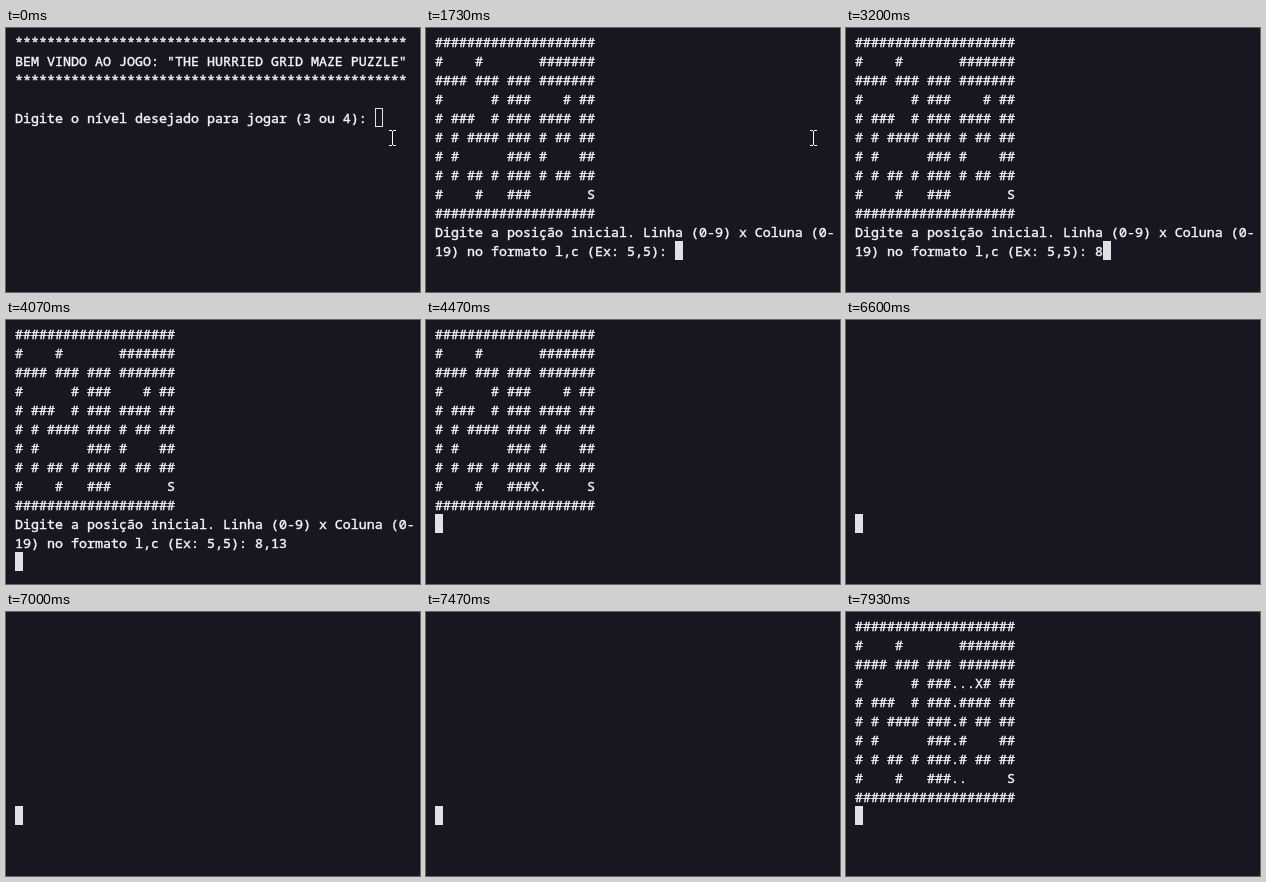
An HTML page for the animation above (8000 ms loop, 414 by 264 pixels).

```html
<!DOCTYPE html>
<html lang="pt">
<head>
<meta charset="utf-8">
<title>Labirinto</title>
<style>
html, body { margin: 0; width: 100%; height: 100%; overflow: hidden; background: #191622; }
svg { display: block; width: 414px; height: 264px; }
text {
  font: 13.333px "Noto Sans Mono", "DejaVu Sans Mono", monospace;
  white-space: pre; fill: #f6f6f8; stroke: #f6f6f8; stroke-width: .4px;
}
#caret { fill: #e1e1e6; stroke: #e1e1e6; }
#mouse { fill: none; stroke: #fff; }
</style>
</head>
<body>
<svg id="stage" viewBox="0 0 414 264">
  <rect id="caret" width="7" height="18"/>
  <path id="mouse" d="M0 .5h3m1 0h3M3.5 1v14M0 15.5h3m1 0h3"/>
</svg>
<script>
const LOOP = 8000, LEFT = 9, TOP = 4, CELL = 8, LINE = 19, BASE = 15;
const stage = document.getElementById('stage');
const caret = document.getElementById('caret');
const mouse = document.getElementById('mouse');

const stars = '*'.repeat(49);
const intro = [
  stars,
  'BEM VINDO AO JOGO: "THE HURRIED GRID MAZE PUZZLE"',
  stars,
  '',
  'Digite o nível desejado para jogar (3 ou 4): '
];
const maze = [
  '####################',
  '#    #       #######',
  '#### ### ### #######',
  '#      # ###    # ##',
  '# ###  # ### #### ##',
  '# # #### ### # ## ##',
  '# #      ### #    ##',
  '# # ## # ### # ## ##',
  '#    #   ###       S',
  '####################'
];
const ask = [
  'Digite a posição inicial. Linha (0-9) x Coluna (0-',
  '19) no formato l,c (Ex: 5,5): '
];
const answer = '8,13', keyTimes = [3200, 3330, 3470, 3670];

// Walk: time, row, column
const start = [4400, 8, 13];
const walk = [
  [4470, 8, 12], [4870, 7, 12], [5330, 6, 12], [5800, 5, 12], [6200, 4, 12],
  [6670, 3, 12], [7070, 3, 13], [7530, 3, 14], [7930, 3, 15]
];
// Cleared screen: from, until
const clears = [[4400, 4470], [5730, 5800], [6600, 6670], [7000, 7070], [7470, 7530], [7870, 7930]];

const lines = Array.from({ length: 13 }, (_, row) => {
  const el = document.createElementNS('http://www.w3.org/2000/svg', 'text');
  el.setAttribute('x', LEFT);
  el.setAttribute('y', TOP + row * LINE + BASE);
  return stage.insertBefore(el, caret);
});

const put = (row, col, ch) => row.slice(0, col) + ch + row.slice(col + 1);

// Types into the last row; the caret follows it until Enter is pressed
function prompt(rows, typed, entered) {
  const last = rows.length - 1;
  const text = rows[last] + typed;
  return {
    rows: [...rows.slice(0, last), text],
    at: entered ? [last + 1, 0] : [last, text.length]
  };
}

function mazeAt(t) {
  const rows = [...maze];
  const trail = [start, ...walk.filter(s => t >= s[0])];
  trail.forEach(([, r, c], i) => {
    rows[r] = put(rows[r], c, i === trail.length - 1 ? 'X' : '.');
  });
  return rows;
}

function screen(t) {
  if (t < 1730) return prompt(intro, t < 1070 ? '' : '3', t >= 1330);
  if (t < 4400) {
    const count = keyTimes.filter(k => t >= k).length;
    return prompt([...maze, ...ask], answer.slice(0, count), t >= 4070);
  }
  const blank = clears.some(([from, until]) => t >= from && t < until);
  return { rows: blank ? [] : mazeAt(t), at: [10, 0] };
}

function mouseAlpha(t) {
  if (t < 600 || (t >= 1730 && t < 2330)) return 1;
  return t >= 2330 && t < 2400 ? 0.5 : 0;
}

function draw(t) {
  const { rows, at: [row, col] } = screen(t);
  lines.forEach((el, i) => {
    const text = rows[i] || '';
    if (el.textContent !== text) el.textContent = text;
  });
  caret.setAttribute('x', LEFT + col * CELL + 0.5);
  caret.setAttribute('y', TOP + row * LINE + 0.5);
  caret.style.fillOpacity = t < 200 ? 0 : 1;
  mouse.setAttribute('transform', `translate(${t < 1730 ? 383 : 384} 102)`);
  mouse.style.opacity = mouseAlpha(t);
}

function tick(now) {
  draw(now % LOOP);
  requestAnimationFrame(tick);
}
draw(0);
requestAnimationFrame(tick);
</script>
</body>
</html>
```
